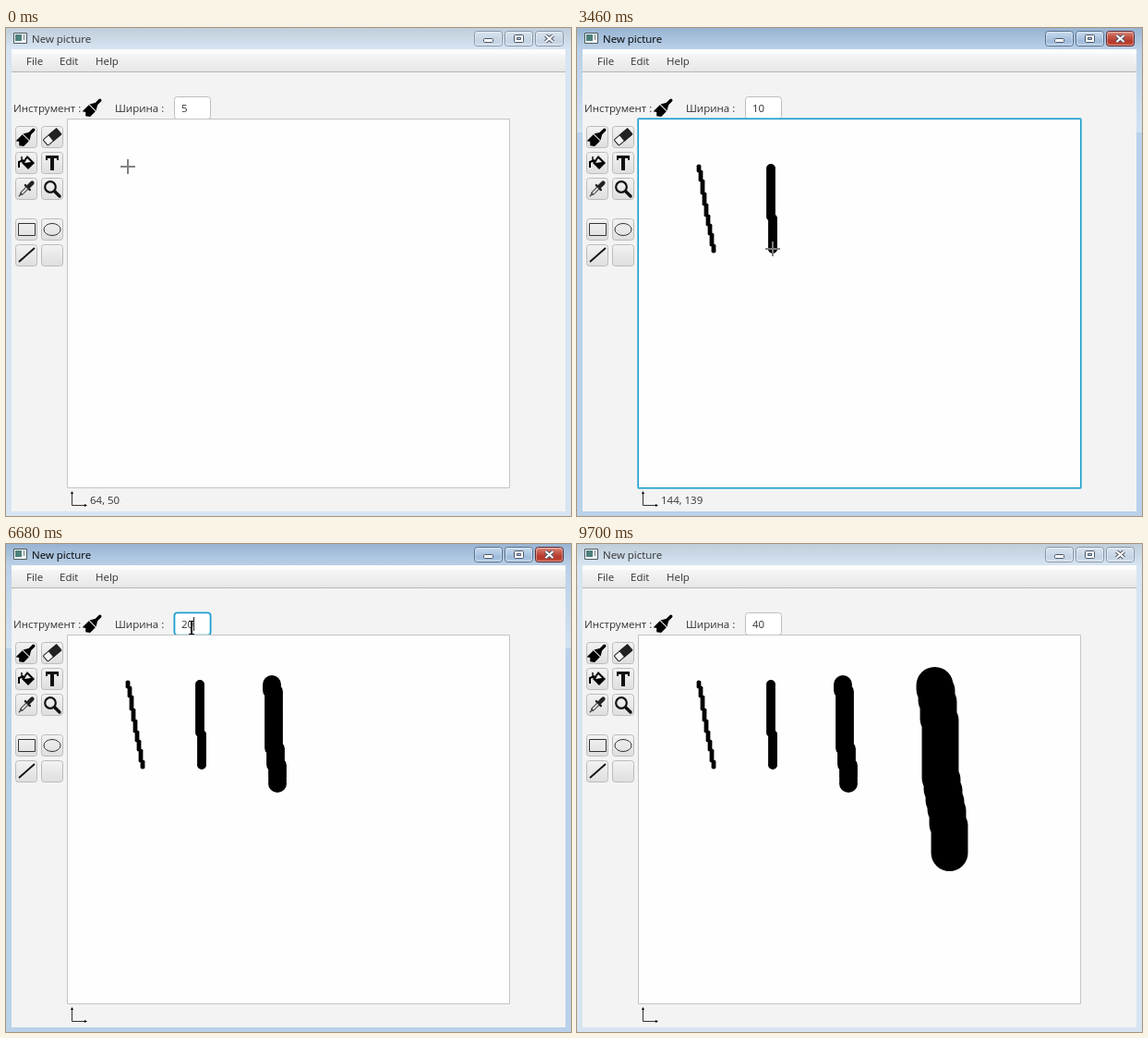
These frames come from a looping animation (612 px wide and 528 px high, 9800 ms). An HTML page with a canvas:

```html
<!DOCTYPE html>
<html lang="en">
<head>
<meta charset="utf-8">
<title>New picture</title>
<style>
html, body { margin: 0; width: 100%; height: 100%; overflow: hidden; }
canvas { display: block; }
</style>
</head>
<body>
<canvas id="stage" width="612" height="528"></canvas>
<script>
const ctx = document.getElementById('stage').getContext('2d');
const LOOP = 9800, LAG = 20, ACTIVATE = 490, DEACTIVATE = 9630;
const FONT = '11.5px "Open Sans", "Noto Sans", sans-serif';
const FOCUS = '#1a9fce';
const FIELD = { x: 201, y: 87 };
const EXIT = { x: 592, y: 540 };

// After each stroke the pointer clicks the width field, and the next width is typed.
const strokes = [
  { width: 5, from: { x: 132, y: 150 }, to: { x: 148, y: 241 }, press: 490, release: 1150, click: 1970 },
  { width: 10, from: { x: 210, y: 152 }, to: { x: 212, y: 239 }, press: 3160, release: 3430, click: 3970 },
  { width: 20, from: { x: 288, y: 152 }, to: { x: 293, y: 259 }, press: 5160, release: 5840, click: 6500 },
  { width: 40, from: { x: 387.5, y: 153 }, to: { x: 403, y: 334 }, press: 8150, release: 8780, click: 9720 }
];

const lerp = (a, b, p) => a + (b - a) * p;
const progress = (t, a, b) => Math.min(1, Math.max(0, (t - a) / (b - a)));
const smooth = p => p * p * (3 - 2 * p);
const inside = (p, l, t, r, b) => p.x >= l && p.x <= r && p.y >= t && p.y <= b;
const overCanvas = p => inside(p, 66, 98, 545, 497);

// A slightly swaying hand, with x moving in steps of two pixels
function strokePoint({ from, to, width }, p) {
  const drift = (to.x - from.x) * p + width / 20 * Math.sin(3 * Math.PI * p);
  return { x: from.x + 2 * Math.round(drift / 2), y: lerp(from.y, to.y, p) };
}

const strokeProgress = (s, t) => Math.sin(progress(t, s.press, s.release) * Math.PI / 2);

function pointerAt(t) {
  const i = Math.max(0, strokes.findLastIndex(s => s.press <= t));
  const stroke = strokes[i], next = strokes[i + 1];
  let p;
  if (t < stroke.release) {
    p = strokePoint(stroke, strokeProgress(stroke, t));
  } else if (t < stroke.click) {
    const goal = next ? FIELD : EXIT;
    const wait = next ? 60 : 150;
    const e = smooth(progress(t, stroke.release + wait, stroke.click - 270));
    p = { x: lerp(stroke.to.x, goal.x, e), y: lerp(stroke.to.y, goal.y, e) };
  } else if (next) {
    const q = progress(t, stroke.click + 150, next.press - 200);
    p = { x: lerp(FIELD.x, next.from.x, q ** 3), y: lerp(FIELD.y, next.from.y, 1 - (1 - q) ** 2) };
  } else {
    p = EXIT;
  }
  return { x: Math.round(p.x + .1), y: Math.round(p.y) };
}

function fieldAt(t) {
  const i = Math.max(0, strokes.findLastIndex(s => s.click <= t) + 1);
  const next = strokes[i], last = strokes[i - 1];
  if (!last) return { value: '5', focused: false };
  if (!next) return { value: String(last.width), focused: false };
  const value = t < last.click + 200 ? last.width : String(next.width)
    .slice(0, (t >= next.press - 760) + (t >= next.press - 360));
  return { value: String(value), focused: t < next.press };
}

function fill(x, y, w, h, style) {
  ctx.fillStyle = style;
  ctx.fillRect(x, y, w, h);
}

function gradient(y0, y1, ...colors) {
  const g = ctx.createLinearGradient(0, y0, 0, y1);
  colors.forEach((c, i) => g.addColorStop(i / (colors.length - 1), c));
  return g;
}

function box(x, y, w, h, r, fillStyle, strokeStyle, lineWidth = 1) {
  ctx.beginPath();
  ctx.roundRect(x + .5, y + .5, w - 1, h - 1, r);
  if (fillStyle) { ctx.fillStyle = fillStyle; ctx.fill(); }
  ctx.strokeStyle = strokeStyle;
  ctx.lineWidth = lineWidth;
  ctx.stroke();
}

function text(s, x, y, color = '#333') {
  ctx.font = FONT;
  ctx.fillStyle = color;
  ctx.fillText(s, x, y);
}

function line(points, color = '#000', width = 1) {
  ctx.beginPath();
  points.forEach(([x, y]) => ctx.lineTo(x, y));
  ctx.strokeStyle = color;
  ctx.lineWidth = width;
  ctx.stroke();
}

function poly(points, color = '#000') {
  ctx.beginPath();
  points.forEach(([x, y]) => ctx.lineTo(x, y));
  ctx.closePath();
  ctx.fillStyle = color;
  ctx.fill();
}

function oval(rx, ry, color, width) {
  ctx.beginPath();
  ctx.ellipse(0, 0, rx, ry, 0, 0, 7);
  ctx.strokeStyle = color;
  ctx.lineWidth = width;
  ctx.stroke();
}

function at(x, y, draw) {
  ctx.save();
  ctx.translate(x, y);
  draw();
  ctx.restore();
}

function brush() {
  ctx.rotate(Math.PI / 4);
  ctx.lineCap = 'round';
  line([[0, -11], [0, -3]], '#000', 3.4);
  poly([[-1.5, -6], [1.5, -6], [5, 0], [-5, 0]]);
  poly([[-5, 1], [5, 1], [5, 9], [1, 12], [-2, 9], [-5, 11]]);
}

function eraser() {
  ctx.rotate(-.7);
  box(-10, -4.5, 20, 9, 1, '#f4f4f4', '#222');
  fill(-2, -4.5, 12, 9, '#222');
}

function bucket() {
  poly([[1, -8], [9, 0], [2, 7], [-5, 0]]);
  poly([[1, -5], [5, -1], [-2, 0]], '#eee');
  line([[-8, 5], [-8, -1], [-3, -3]], '#000', 2);
  line([[-5, -7], [-5, -1]], '#000', 1.4);
}

function letterT() {
  fill(-7, -8, 14, 3, '#111');
  fill(-7, -8, 2, 5, '#111');
  fill(5, -8, 2, 5, '#111');
  fill(-2, -8, 4, 16, '#111');
}

function dropper() {
  ctx.rotate(Math.PI / 4);
  ctx.lineCap = 'round';
  line([[0, -9], [0, -4]], '#222', 4.5);
  line([[-3.5, -2], [3.5, -2]], '#222', 2.4);
  line([[0, 0], [0, 7]], '#444', 4);
  line([[0, 0], [0, 6]], '#ddd', 2);
  line([[0, 8], [0, 11]], '#444', 1.4);
}

function magnifier() {
  ctx.lineCap = 'round';
  line([[3, 3], [8, 8]], '#111', 3.4);
  at(-2, -2, () => oval(5.8, 5.8, '#111', 2.2));
}

const icons = [
  brush, eraser, bucket, letterT, dropper, magnifier,
  () => box(-9, -7, 19, 14, 0, null, '#333'),
  () => oval(9, 6.5, '#333', 1),
  () => line([[-8, 7], [9, -8]], '#111', 1.8),
  () => {}
];

function drawTool(icon, i) {
  const row = i >> 1;
  const x = 10 + 28 * (i % 2), y = 106 + 28 * row + (row > 2 ? 16 : 0);
  box(x, y, 24, 24, 3, gradient(y, y + 24, '#f3f3f3', '#dedede'), '#bcbcbc');
  at(x + 12, y + 12, icon);
}

function titleButton(x, active, close) {
  const colors = !active ? ['#d9e4ef', '#cfdce9', '#c4d3e2', '#d6e2ee']
    : close ? ['#de9a8e', '#c95c4c', '#b5372a', '#c9583f']
    : ['#c9dbee', '#b6cde6', '#9fbbda', '#bbd2ea'];
  const edge = !active ? '#8796a9' : close ? '#5b2730' : '#566f8e';
  box(x, 3, 31, 17, 3, gradient(3, 20, ...colors), edge);
  box(x + 1, 4, 29, 15, 2, null, 'rgba(255,255,255,.4)');
}

function drawWindow(active) {
  fill(0, 0, 612, 528, active ? '#b9d1ea' : '#d7e4f2');
  fill(0, 0, 612, 23, active ? gradient(0, 23, '#98b4d2', '#bad0e7') : gradient(0, 23, '#c0ceda', '#d7e4f2'));
  if (active) fill(0, 23, 612, 90, gradient(23, 113, '#bad0e7', '#d2e2f1'));
  fill(6, 23, 600, 500, '#f3f3f3');
  fill(6, 23, 600, 5, '#fcfcfc');
  fill(6, 28, 600, 19, gradient(28, 47, '#f6f6f6', '#e7e7e7'));
  fill(6, 47, 600, 1, '#b6b6b6');

  box(8, 5, 15, 12, 0, '#f5f8f8', '#4d5c62');
  fill(10, 7, 7, 7, '#4d807c');
  fill(19, 7, 1, 6, '#77868a');
  text('New picture', 28, 16, active ? '#000' : '#333');

  for (let i = 0; i < 3; i++) titleButton(507 + 33 * i, active, i === 2);
  box(517, 11, 11, 5, 1, '#fff', '#4a5568');
  box(550, 7, 11, 9, 1, '#fff', '#4a5568');
  box(553, 10, 5, 3, 0, '#b8cbe0', '#4a5568');
  for (const [color, width] of [['#4a5060', 4.2], ['#fff', 2.2]]) {
    line([[584.5, 8], [592.5, 15]], color, width);
    line([[592.5, 8], [584.5, 15]], color, width);
  }

  text('File', 22, 40);
  text('Edit', 58, 40);
  text('Help', 97, 40);
  text('Инструмент :', 8, 91);
  text('Ширина :', 118, 91);
  at(94, 86, brush);
  icons.forEach(drawTool);

  line([[71.5, 503], [71.5, 516.5], [86, 516.5]], '#333');
  poly([[71.5, 501], [73, 504], [70, 504]]);
  poly([[88, 516.5], [85, 518], [85, 515]]);
}

function drawField({ value, focused }) {
  if (focused) box(181, 73, 42, 26, 4, null, 'rgba(26,159,206,.25)');
  box(182, 74, 40, 25, 3, '#fff', focused ? FOCUS : '#bdbdbd', focused ? 1.6 : 1);
  text(value, 190, 91);
  if (focused) fill(190 + Math.round(ctx.measureText(value).width), 79, 1, 15, '#222');
}

function drawPaper(focused) {
  if (focused) box(65, 97, 482, 402, 1, null, 'rgba(26,159,206,.6)');
  box(66, 98, 480, 400, 0, '#fefefe', focused ? FOCUS : '#c4c4c4');
}

function drawStroke(stroke, t) {
  if (t < stroke.press) return;
  const head = strokeProgress(stroke, t - LAG);
  const step = 2 / (stroke.to.y - stroke.from.y);
  const dab = p => {
    const { x, y } = strokePoint(stroke, p);
    ctx.moveTo(x, y);
    ctx.arc(x, y, stroke.width / 2, 0, 7);
  };
  ctx.beginPath();
  for (let p = 0; p < head; p += step) dab(p);
  dab(head);
  ctx.fillStyle = '#000';
  ctx.fill();
}

function drawPointer(p) {
  const { x, y } = p;
  if (overCanvas(p)) {
    ctx.globalCompositeOperation = 'difference';
    fill(x - 8, y - 1, 16, 2, '#7c7c7c');
    fill(x - 1, y - 8, 2, 7, '#7c7c7c');
    fill(x - 1, y + 1, 2, 7, '#7c7c7c');
    ctx.globalCompositeOperation = 'source-over';
  } else if (inside(p, 182, 74, 222, 97)) {
    fill(x - 1, y - 6, 2, 13, '#000');
    fill(x - 3, y - 7, 6, 1, '#000');
    fill(x - 3, y + 7, 6, 1, '#000');
  } else {
    const arrow = [[0, 0], [0, 16], [4, 12.5], [6.5, 18], [9, 17], [6.5, 11.5], [11, 11.5]];
    at(x + .5, y + .5, () => {
      poly(arrow, '#fff');
      line([...arrow, arrow[0]]);
    });
  }
}

function render(t) {
  const active = t >= ACTIVATE && t < DEACTIVATE;
  const field = fieldAt(t);
  drawWindow(active);
  drawField(field);
  drawPaper(active && !field.focused);
  strokes.forEach(s => drawStroke(s, t));

  const seen = pointerAt(t - LAG);
  if (overCanvas(seen)) text(`${seen.x - 68}, ${seen.y - 100}`, 91, 515);
  const resting = t < ACTIVATE;
  drawPointer(pointerAt(t), resting);
}

const start = performance.now();
function tick() {
  render((performance.now() - start) % LOOP);
  requestAnimationFrame(tick);
}
tick();
</script>
</body>
</html>
```
